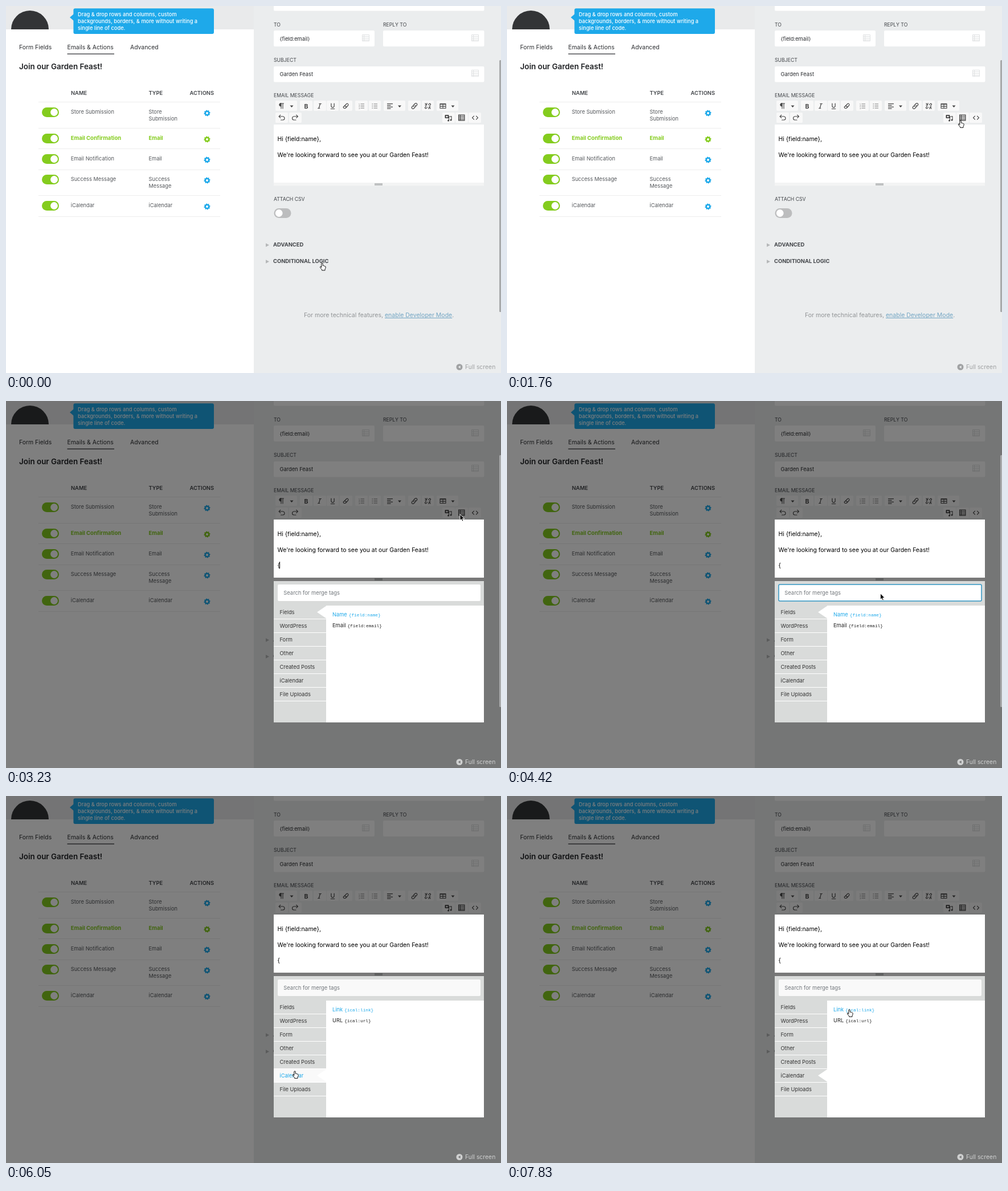
These frames come from a looping animation (869x644 px, 8 s). An HTML page with a canvas:

```html
<!DOCTYPE html>
<html lang="en">
<head>
<meta charset="utf-8">
<title>Email action editor</title>
<style>
html, body { margin: 0; width: 100%; height: 100%; overflow: hidden; background: #ebedee; }
canvas { display: block; width: 869px; height: 644px; }
</style>
</head>
<body>
<canvas id="stage" width="869" height="644"></canvas>
<script>
const ctx = document.getElementById('stage').getContext('2d');
const LOOP = 8000, STEP = 147.6;
const BLUE = '#1ea9ea', GREEN = '#84cc1e', INK = '#424549', BG = '#ebedee', PANEL = '#d9dbda';
const SANS = 'Inter, "Open Sans", sans-serif', MONO = '"Liberation Mono", monospace';

function text(s, x, y, size = 9.3, color = INK, weight = 400, font = SANS) {
  ctx.font = `${weight} ${size}px ${font}`;
  ctx.fillStyle = color;
  ctx.fillText(s, x, y);
  return ctx.measureText(s).width;
}
function rect(x, y, w, h, color, r = 0) {
  ctx.fillStyle = color;
  ctx.beginPath();
  ctx.roundRect(x, y, w, h, r);
  ctx.fill();
}
function frame(x, y, w, h, color, r = 0, lw = 1) {
  ctx.strokeStyle = color;
  ctx.lineWidth = lw;
  ctx.beginPath();
  ctx.roundRect(x, y, w, h, r);
  ctx.stroke();
}
function disc(x, y, r, color) {
  ctx.fillStyle = color;
  ctx.beginPath();
  ctx.arc(x, y, r, 0, Math.PI * 2);
  ctx.fill();
}
function path(d, x, y, stroke, fill, lw = 1) {
  const p = new Path2D(d);
  ctx.save();
  ctx.translate(x, y);
  ctx.lineJoin = ctx.lineCap = 'round';
  ctx.lineWidth = lw;
  if (fill) { ctx.fillStyle = fill; ctx.fill(p); }
  if (stroke) { ctx.strokeStyle = stroke; ctx.stroke(p); }
  ctx.restore();
}

function toggle(x, y, on) {
  rect(x, y, 30, 17, on ? GREEN : '#bcbdbe', 8.5);
  disc(x + (on ? 21.5 : 8.7), y + 8.5, 6.4, '#fff');
}
function gear(x, y, color) {
  ctx.fillStyle = color;
  ctx.beginPath();
  for (let i = 0; i < 32; i++) {
    const a = (i + 0.5) / 32 * Math.PI * 2, r = (i + 2) % 4 < 2 ? 5.6 : 4.5;
    ctx.lineTo(x + r * Math.cos(a), y + r * Math.sin(a));
  }
  ctx.closePath();
  ctx.moveTo(x + 1.9, y);
  ctx.arc(x, y, 1.9, 0, Math.PI * 2);
  ctx.fill('evenodd');
}
function listIcon(x, y, w, h, color) {
  frame(x + .5, y + .5, w - 1, h - 1, color);
  for (let i = 1; i < 4; i++) rect(x, y + Math.round(h * i / 4), w, 1, color);
  rect(x + 3, y, 1, h, color);
}

const ROWS = [
  [186, ['Store Submission'], ['Store', 'Submission'], 214],
  [232, ['Email Confirmation'], ['Email'], 250],
  [268, ['Email Notification'], ['Email'], 287],
  [304, ['Success Message'], ['Success', 'Message'], 332],
  [350, ['iCalendar'], ['iCalendar'], 369]
];

function leftPanel() {
  rect(0, 0, 435, 41, '#e9eaeb');
  disc(42, 41, 33, '#333436');
  rect(0, 41, 435, 603, '#fff');
  rect(118.4, 4.3, 246.6, 44.7, BLUE, 3);
  path('M0 0 L7 -6 V6 Z', 112, 20, null, BLUE);
  ['Drag & drop rows and columns, custom',
   'backgrounds, borders, & more without writing a',
   'single line of code.'].forEach((s, i) => text(s, 126, 17.7 + i * 12.3, 9.25, '#fff', 500));

  text('Form Fields', 23, 76, 10.4, '#2b2d30');
  text('Emails & Actions', 107.5, 76, 10.4, '#2b2d30');
  text('Advanced', 218, 76, 10.4, '#2b2d30');
  rect(107.5, 83.5, 82.5, 1.3, '#2b2d30');
  text('Join our Garden Feast!', 23, 110.5, 13.4, '#1f2124', 600);

  [['NAME', 114], ['TYPE', 250.5], ['ACTIONS', 322.5]]
    .forEach(([s, x]) => text(s, x, 155.5, 9.4, INK, 600));
  rect(57, 168, 319, 1, '#ededed');
  ROWS.forEach(([y, name, type, line], i) => {
    const on = i === 1, color = on ? GREEN : '#55585c';
    const size = on ? 9.5 : 9.25, weight = on ? 700 : 400;
    toggle(63, y - 8, true);
    text(name[0], 113.7, y + 3, size, color, weight);
    type.forEach((s, n) => text(s, 250.5, y + 3 + n * 12.3, size, color, weight));
    gear(353, y + 2, on ? GREEN : BLUE);
    rect(57, line, 319, 1, '#ededed');
  });
}

const DARK = '#444';
function icon(d, x, y, lw = 1.1, fill = null) { path(d, x, y, DARK, fill, lw); }
function caretDown(x, y) { path('M-3 -1.5 H3 L0 2 Z', x, y, null, DARK); }

function toolbar() {
  [[473, 38], [516, 22], [540, 22], [563, 21], [586, 22], [613, 22], [637, 21],
   [663, 38], [706, 22], [730, 21], [756, 38]].forEach(([x, w]) => rect(x, 166, w, 18, '#f8f8f8', 2));
  [473, 497, 766, 789, 812].forEach(x => rect(x, 187, 22, 18, '#f8f8f8', 2));

  icon('M0 -4.5 V4.5 M3 -4.5 V4.5 M4.5 -4.5 H-1', 483, 175.5);
  path('M0 -5 A2.8 2.8 0 0 0 0 .6 Z', 482.5, 175.5, DARK, DARK, .8);
  [501.5, 691, 784.5].forEach(x => caretDown(x, 176));
  text('B', 523.5, 179.5, 10.5, DARK, 700);
  icon('M1.8 -4 H-.2 M1.8 -4 H3.4 M1.6 -4 L-.8 4 M-2.4 4 H.8', 550, 175.5, 1.2);
  icon('M-2.6 -4.5 V0 A2.6 2.6 0 0 0 2.6 0 V-4.5 M-3.2 5 H3.2', 573.5, 175.5, 1.2);
  icon('M-4.5 2 L1.5 -4 Q2.5 -5 3.5 -4 L4.3 -3 Q5 -2 4 -1 L-.8 4 H-3.2 Z M-2 -.5 L1.6 2.2', 596.5, 175.5);
  for (let i = 0; i < 3; i++) {
    const y = 172 + i * 3.5, grey = '#777';
    text(i + 1, 619, y + 1.5, 4, grey);
    rect(622.5, y - .5, 6.5, 1, grey);
    disc(643.2, y, .8, grey);
    rect(645.5, y - .5, 6.5, 1, grey);
  }
  [10, 6.5, 10, 6.5].forEach((w, i) => rect(669, 171 + i * 2.8, w, 1.2, DARK));
  const link = 'M-1 1 Q-2.6 -.7 -1 -2.3 L1.3 -4.5 Q3 -5.5 4.3 -4.2 Q5.5 -3 4.3 -1.5 L3 0 ' +
    'M1 -1 Q2.6 .7 1 2.3 L-1.3 4.5 Q-3 5.5 -4.3 4.2 Q-5.5 3 -4.3 1.5 L-3 0';
  icon(link, 717, 175.5, 1.2);
  icon('M1 -2 L2.5 -4 Q4.5 -5 5 -2.8 L3 0 M-1 2 L-2.5 4 Q-4.5 5 -5 2.8 L-3 0 ' +
    'M-4.5 -4.5 L-2 -2 M-4.7 -1.5 H-3 M-1.5 -5 V-3.5 M4.5 4.5 L2 2 M4.7 1.5 H3 M1.5 5 V3.5', 740.5, 175.5, 1.2);
  icon('M-5 -4 H5 V4 H-5 Z M-5 -2.8 H5 M-5 .6 H5 M0 -3 V4', 767, 175.5);

  const undo = 'M-2.2 -5 L-5 -2.4 L-2.2 .2 M-4.8 -2.4 H2 Q5 -2 5 .8 Q5 3.8 2 3.8 H-1.5';
  icon(undo, 484, 196.2);
  ctx.save();
  ctx.translate(507.5, 196.2);
  ctx.scale(-1, 1);
  icon(undo, 0, 0);
  ctx.restore();

  rect(770.5, 191, 7, 6, DARK, 1);
  disc(774, 194, 1.6, '#f8f8f8');
  icon('M-1.5 4 V-2.5 L3 -3.5 V3', 779, 197);
  disc(776.6, 201, 1.5, DARK);
  disc(781, 200, 1.5, DARK);
  frame(794.6, 191.1, 10.3, 9.8, DARK, 0, 1.2);
  for (let i = 0; i < 3; i++) rect(794.5, 193 + i * 2.7, 10.5, 1.1, DARK);
  rect(797, 191, 1, 10, DARK);
  icon('M-2 -3 L-5 0 L-2 3 M2 -3 L5 0 L2 3', 823.5, 196.2, 1.2);
}

function rightPanel() {
  rect(470, -5, 369.5, 13.5, '#fff', 2);
  rect(470, 43, 177, 28, '#fff', 2);
  rect(662, 43, 177.5, 28, '#fff', 2);
  rect(470, 106, 369.5, 27.5, '#fff', 2);
  [['TO', 470, 35.5], ['REPLY TO', 662, 35.5], ['SUBJECT', 470, 98], ['EMAIL MESSAGE', 470, 160],
   ['ATTACH CSV', 470, 342]].forEach(([s, x, y]) => text(s, x, y, 8.7));
  text('{field:email}', 480.5, 61, 9.3, '#2b2d30');
  text('Garden Feast', 480.5, 123, 9.3, '#2b2d30');
  [[625, 50], [817, 50], [817, 112]].forEach(([x, y]) => listIcon(x, y, 13, 12, '#dfe1e2'));
  toolbar();
  rect(470, 310, 369, 5.5, '#f3f4f4');
  rect(647, 311, 14, 4, '#bfc1c2');
  toggle(470.5, 355, false);
  [['ADVANCED', 419], ['CONDITIONAL LOGIC', 448]].forEach(([s, y]) => {
    path('M0 -3.2 L6 0 L0 3.2 Z', 456, y + .5, null, '#b5b7b8');
    text(s, 469, y + 3.4, 9.4, INK, 700);
  });
  const lead = text('For more technical features, ', 523, 546, 10.5, '#909395');
  const link = text('enable Developer Mode', 523 + lead, 546, 10.5, '#72a5c3');
  rect(523 + lead, 547, link, 1, '#72a5c3');
  text('.', 523 + lead + link, 546, 10.5, '#909395');
}

const within = (t, ...spans) => spans.some(([a, b]) => t >= a && t < b);

function editor(t, open) {
  rect(470, 208, 369, 102, '#fff');
  text('Hi {field:name},', 476.5, 237.3, 10.42, '#000');
  text("We're looking forward to see you at our Garden Feast!", 476.5, 264.8, 10.42, '#000');
  if (open) text('{', 476.5, 292.3, 10.42, '#000');
  if (within(t, [140, 590], [1030, 1470], [2050, 2490])) rect(476, 282, 1, 12, '#000');
  if (within(t, [3230, 3680])) rect(480, 282, 1, 12, '#000');
}

const TABS = ['Fields', 'WordPress', 'Form', 'Other', 'Created Posts', 'iCalendar', 'File Uploads'];
const TAGS = {
  0: [['Name', '{field:name}'], ['Email', '{field:email}']],
  5: [['Link', '{ical:link}'], ['URL', '{ical:url}']]
};
const tabAt = p => p.x > 470 && p.x < 562 && p.y > 359 && p.y < 527 ? Math.floor((p.y - 359) / 24) : -1;
const onTag = (p, i) => p.x > 573 && p.x < 660 && Math.abs(p.y - 375 - i * 19) < 9.5;

function mergeBox(t, mouse) {
  const active = t < 5900 ? 0 : 5, hover = tabAt(mouse);
  rect(470, 316, 369, 248, PANEL);
  rect(477, 322, 356, 29, t < 5900 ? '#fff' : '#f9f9f9', 2);
  if (within(t, [3680, 6050])) {
    ctx.globalAlpha = t < 5900 ? 1 : .4;
    frame(477, 322, 356, 29, '#3195c2', 2, 1.5);
    ctx.globalAlpha = 1;
  }
  text('Search for merge tags', 487.3, 340.3, 9.4, '#72777c');
  if (within(t, [3680, 4280], [4720, 5160], [5600, 5900])) rect(487, 330, 1, 12, '#000');
  rect(562, 359, 277, 205, '#fff');
  TABS.forEach((s, i) => {
    const y = 359 + i * 24;
    if (i === hover) rect(470, y, 92, 23, '#f9f9f9');
    rect(470, y + 23, 92, 1, '#fff');
    text(s, 480.5, y + 14.6, 9.3, i === hover ? BLUE : '#333');
    if (i === active) path('M0 0 L17 -11.5 V11.5 Z', 546, y + 11.5, null, '#fff');
  });
  const picked = onTag(mouse, 1) ? 1 : 0;
  TAGS[active].forEach(([name, tag], i) => {
    const color = i === picked ? BLUE : '#222', y = 378 + i * 19;
    const w = text(name, 573, y, 9.3, color);
    text(tag, 573 + w + 3, y, 7.75, color, 400, MONO);
  });
}

// Pointer stops: step index, x, y of the hot spot.
const STOPS = [
  [0, 555, 451.5], [8, 778, 214], [9, 790, 203], [10, 799, 201], [12, 796, 201], [14, 797, 199],
  [26, 797, 199], [34, 514, 477], [36, 507, 483], [44, 507, 483], [52, 601, 375], [60, 601, 375]
];
function pointer(t) {
  const k = Math.floor((t + 12) / STEP);
  const i = STOPS.findIndex((s, n) => n && k <= s[0]);
  const [k0, x0, y0] = STOPS[i - 1], [k1, x1, y1] = STOPS[i];
  const u = (k - k0) / (k1 - k0), e = u * u * (3 - 2 * u);
  return { x: x0 + (x1 - x0) * e, y: y0 + (y1 - y0) * e };
}

function pointerKind(t, p, open) {
  if (open) {
    if (tabAt(p) >= 0) return 'hand';
    return t >= 7830 || onTag(p, 1) ? 'hand' : 'arrow';
  }
  if (p.y < 206 && p.x > 766) return 'hand';
  if (p.y > 440 && p.x < 568) return 'hand';
  return p.y > 208 && p.y < 310 ? 'beam' : 'arrow';
}
const SHAPES = {
  hand: ['M-1.2 7 V1 Q-1.1 -.2 0 -.2 Q1.2 -.2 1.2 1 V4.2 Q2.4 3.6 3 4.6 Q4.2 4.1 4.6 5.2 Q6.2 5 6.2 6.6 ' +
    'Q6.2 9 5 10.3 V12.4 H-.4 V11.2 Q-2.5 9 -3.6 7 Q-3.8 5.4 -2.4 5.8 Z', '#111', '#fff', 1],
  arrow: ['M0 0 V10.5 L2.4 8.3 L4 12 L5.8 11.2 L4.2 7.6 H7.4 Z', '#fff', '#000', .9],
  beam: ['M-2 -6 Q0 -6 0 -4.5 Q0 -6 2 -6 M0 -4.5 V4.5 M-2 6 Q0 6 0 4.5 Q0 6 2 6', '#222', null, 1]
};

function fullScreen(open) {
  const color = open ? '#cfd0d0' : '#a0a2a3';
  disc(796, 633.5, 5.5, color);
  path('M-2.2 0 L1.6 -2.6 V2.6 Z', 796, 633.5, null, open ? '#757677' : BG);
  text('Full screen', 806, 637.2, 10.4, color);
}

function draw(t) {
  const open = t >= 3230, mouse = pointer(t);
  rect(0, 0, 869, 644, BG);
  leftPanel();
  rightPanel();
  if (within(t, [3090, 3230])) frame(789.2, 187.2, 21.6, 17.6, '#1b67c9', 2, 1.8);
  if (open) rect(0, 0, 869, 644, 'rgba(0,0,0,.5)');
  if (t < 4570) rect(866, 95, 4, 442, '#a8aaab', 1.5);
  editor(t, open);
  if (open) mergeBox(t, mouse);
  fullScreen(open);
  const [d, stroke, fill, lw] = SHAPES[pointerKind(t, mouse, open)];
  path(d, mouse.x, mouse.y, stroke, fill, lw);
}

const start = performance.now();
function tick(now) {
  draw(Math.max(0, now - start) % LOOP);
  requestAnimationFrame(tick);
}
tick(start);
</script>
</body>
</html>
```
